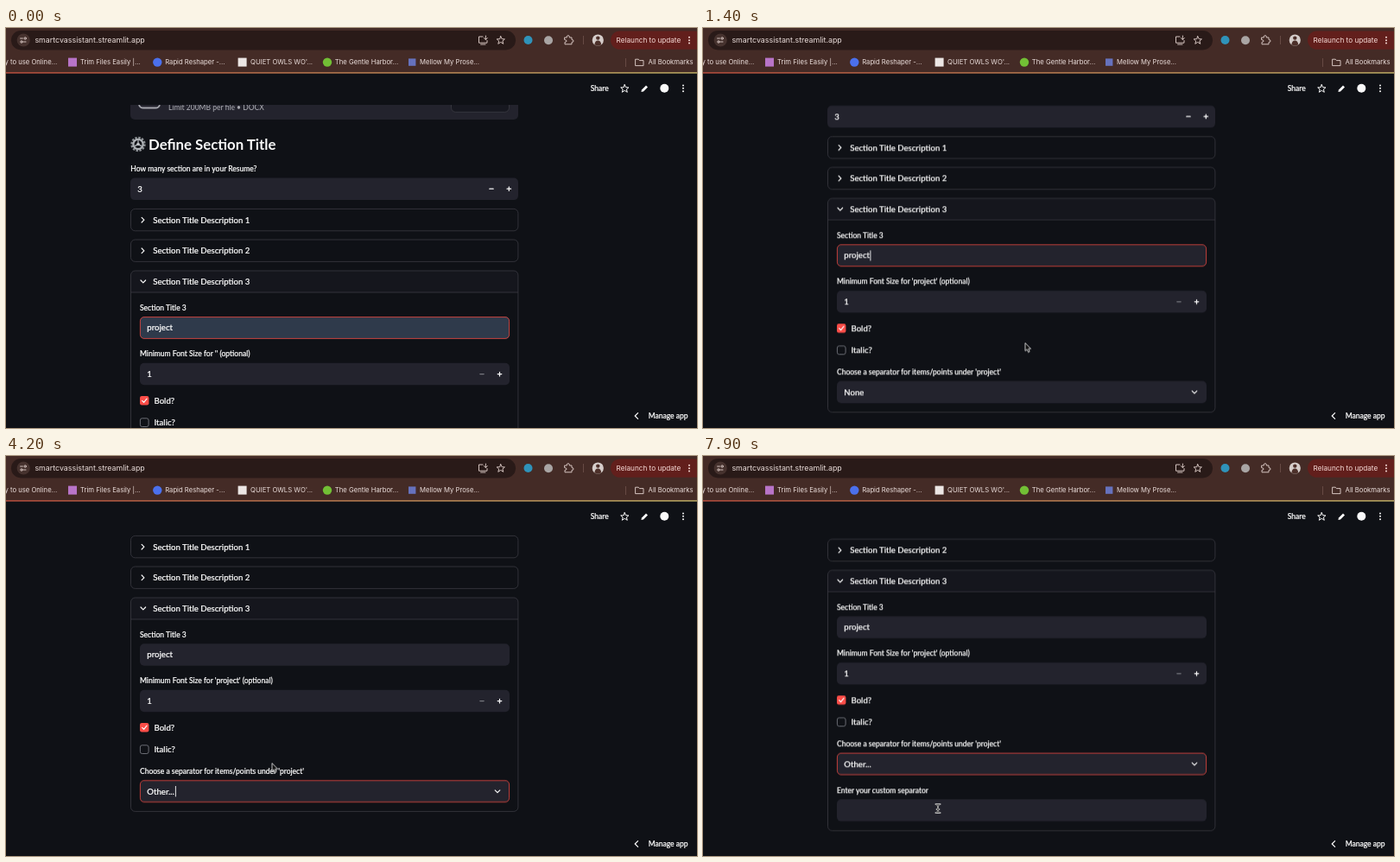
Write an HTML page that moves like this. It is 800 by 463 pixels and loops after 8 s.

```html
<!DOCTYPE html>
<html lang="en">
<head>
<meta charset="utf-8">
<title>Resume section form</title>
<style>
  html, body { margin: 0; width: 100%; height: 100%; overflow: hidden; background: #0f1116; }
  svg { display: block; width: 100vw; height: 100vh; }

  text { font: 500 9.6px Lato, "Open Sans", sans-serif; fill: #fafafa; stroke: #fafafa; stroke-width: .22; }
  .label { font-size: 8.5px; }
  .title { font-size: 16.8px; font-weight: 700; stroke: none; }
  .hint { fill: #a5a6ad; stroke: none; }
  .bar text { font: 400 7.7px Inter, Roboto, sans-serif; fill: #ecdfdc; stroke: none; }
  .bar .url { font-size: 8.85px; }
  .bar .update { font-size: 8.2px; fill: #f8dcd8; }

  .field { fill: #23232d; }
  .card { fill: none; stroke: #3b3c43; stroke-width: .8; }
  .focus { fill: none; stroke: #e0453d; stroke-width: .85; }
  .line { fill: none; stroke: #fafafa; stroke-width: 1.2; stroke-linecap: round; stroke-linejoin: round; }
  .thin { stroke-width: 1; }
  .bar .line { stroke: #dccbc7; stroke-width: .95; }
  .muted { stroke: #77787f; }
  .caret { stroke: #fafafa; stroke-width: .9; animation: blink 1s -.85s step-end infinite; }

  /* One 8 s timeline: 1% = 80 ms */
  .page, .pointer { animation: scroll 8s linear infinite; }
  .pointer { animation-name: point; animation-timing-function: ease-in-out; }
  .step { animation: 8s step-end infinite; }
  .autofill { animation-name: autofill; }
  .blank { animation-name: blank; }
  .named { animation-name: named; }
  .typing { animation-name: typing; }
  .picking { animation-name: picking; }
  .none { animation-name: none-value; }
  .other { animation-name: other-value; }
  .custom { animation-name: custom; }
  .short { animation-name: short; }
  .arrow { animation-name: arrow; }
  .beam { animation-name: beam; }

  @keyframes scroll {
    0%, 12.5% { transform: translateY(0); }
    17.5% { transform: translateY(-83.5px); animation-timing-function: ease-out; }
    21%, 63.75% { transform: translateY(-117px); }
    65% { transform: translateY(-122.7px); animation-timing-function: ease-out; }
    68.5%, 100% { transform: translateY(-148.7px); }
  }
  @keyframes point {
    0%, 21.25% { transform: translate(373px, 364.5px); }
    25%, 37.5% { transform: translate(373.5px, 380px); }
    47.5%, 55% { transform: translate(308px, 355.5px); }
    63.75%, 67.5% { transform: translate(266.8px, 426px); }
    72.5%, 100% { transform: translate(272px, 408px); }
  }
  @keyframes blink { 0% { opacity: 1; } 50%, 100% { opacity: 0; } }
  @keyframes autofill { 0% { opacity: 1; } 3.75%, 100% { opacity: 0; } }
  @keyframes blank { 0% { opacity: 1; } 8.75%, 100% { opacity: 0; } }
  @keyframes named { 0% { opacity: 0; } 8.75%, 100% { opacity: 1; } }
  @keyframes typing { 0% { opacity: 1; } 25%, 100% { opacity: 0; } }
  @keyframes picking { 0% { opacity: 0; } 37.5%, 100% { opacity: 1; } }
  @keyframes none-value { 0% { opacity: 1; } 50%, 100% { opacity: 0; } }
  @keyframes other-value { 0% { opacity: 0; } 50%, 100% { opacity: 1; } }
  @keyframes custom { 0% { opacity: 0; } 57.5%, 100% { opacity: 1; } }
  @keyframes short { 0% { opacity: 1; } 57.5%, 100% { opacity: 0; } }
  @keyframes arrow { 0% { opacity: 0; } 6.25% { opacity: 1; } 25% { opacity: 0; } 41.25% { opacity: 1; } 68.75%, 100% { opacity: 0; } }
  @keyframes beam { 0% { opacity: 0; } 25% { opacity: 1; } 41.25% { opacity: 0; } 68.75%, 100% { opacity: 1; } }
</style>
</head>
<body>
<svg viewBox="0 0 800 463">
  <defs>
    <linearGradient id="stripe">
      <stop stop-color="#e8604a"/>
      <stop offset="1" stop-color="#f2dc7c"/>
    </linearGradient>
    <clipPath id="view"><rect y="89" width="800" height="374"/></clipPath>
    <rect id="box" x="155" width="428" height="25.6" rx="5"/>
    <rect id="ring" x="155.4" y=".4" width="427.2" height="24.8" rx="4.6"/>
    <path id="right" d="M-1.4-2.8 1.4 0-1.4 2.8"/>
    <path id="down" d="M-2.8-1.4 0 1.4 2.8-1.4"/>
    <path id="minus" d="M-2.2 0H2.2"/>
    <path id="plus" d="M-2.3 0H2.3M0-2.3V2.3"/>
    <path id="star" d="M0-4.6 1.4-1.5 4.6-1.3 2.1.8 3 4.1 0 2.2-3 4.1-2.1.8-4.6-1.3-1.4-1.5Z"/>
    <path id="ibeam" d="M-2.4-5Q0-5 0-3.6Q0-5 2.4-5M0-3.6V3.6M-2.4 5Q0 5 0 3.6Q0 5 2.4 5M-1.3 1H1.3"/>
    <g id="dots"><circle cy="-3.4" r="1"/><circle r="1"/><circle cy="3.4" r="1"/></g>
  </defs>

  <rect width="800" height="463" fill="#0f1116"/>

  <g clip-path="url(#view)">
    <g class="page">
      <!-- uploader remainder -->
      <rect class="field" x="144" y="60" width="449" height="46" rx="5"/>
      <path d="M154 89Q155 92.5 159 92.5H173Q177 92.5 178 89" fill="none" stroke="#a5a6ad" stroke-width="1.8"/>
      <text class="label hint" x="188" y="95.4">Limit 200MB per file • DOCX</text>
      <rect x="515.5" y="72" width="67" height="25.3" rx="5" fill="#171820" stroke="#3b3c43" stroke-width=".8"/>

      <g transform="translate(153 134.5)" fill="none">
        <circle r="7.4" stroke="#8c9094" stroke-width="2.6" stroke-dasharray="2.4 1.475"/>
        <circle r="5.6" stroke="#aeb2b6" stroke-width="2.2"/>
        <path d="M0 0V-5M0 0 4.4 2.5M0 0-4.4 2.5" stroke="#9a9ea2" stroke-width="1.5"/>
        <circle r="1.8" fill="#bfc3c6"/>
      </g>
      <text class="title" x="165" y="141">Define Section Title</text>

      <text class="label" x="144.3" y="165.8">How many section are in your Resume?</text>
      <rect class="field" x="144" y="173.5" width="449" height="25.6" rx="5"/>
      <text x="152.3" y="189.7">3</text>
      <use href="#minus" class="line" x="562" y="186.2"/>
      <use href="#plus" class="line" x="582.3" y="186.2"/>

      <rect class="card" x="144.5" y="209.4" width="448.4" height="25.4" rx="5"/>
      <use href="#right" class="line" x="158.5" y="222.2"/>
      <text x="170.2" y="225.8">Section Title Description 1</text>

      <rect class="card" x="144.5" y="245" width="448.4" height="25.4" rx="5"/>
      <use href="#right" class="line" x="158.5" y="257.8"/>
      <text x="170.2" y="261.4">Section Title Description 2</text>

      <path d="M144.5 306V286Q144.5 281 149.5 281H588Q592.9 281 592.9 286V306Z" fill="#15161d"/>
      <path class="card" d="M144.5 306H592.9"/>
      <rect class="card step short" x="144.5" y="281" width="448.4" height="247.4" rx="5"/>
      <rect class="card step custom" x="144.5" y="281" width="448.4" height="301.4" rx="5"/>
      <use href="#down" class="line" x="158.8" y="293.4"/>
      <text x="170.2" y="297.4">Section Title Description 3</text>

      <text class="label" x="155" y="326.7">Section Title 3</text>
      <use href="#box" class="field" y="334.2"/>
      <use href="#box" class="step autofill" y="334.2" fill="#2f3a4b"/>
      <text x="163.3" y="350.3">project</text>
      <g class="step typing">
        <use href="#ring" class="focus" y="334.2"/>
        <path class="caret" d="M193.9 341.2V353.2"/>
      </g>

      <text class="label step blank" x="155" y="380.4">Minimum Font Size for '' (optional)</text>
      <text class="label step named" x="155" y="380.4">Minimum Font Size for 'project' (optional)</text>
      <use href="#box" class="field" y="387.7"/>
      <text x="163.3" y="404">1</text>
      <use href="#minus" class="line muted" x="551" y="400.6"/>
      <use href="#plus" class="line" x="571.5" y="400.6"/>

      <rect x="155" y="426" width="10.4" height="10.4" rx="2.2" fill="#fb4d48"/>
      <path class="line" d="M157.6 431.3 159.6 433.3 163 429.2"/>
      <text x="171.5" y="434.7">Bold?</text>
      <rect x="155.4" y="451.8" width="9.7" height="9.7" rx="2.2" fill="none" stroke="#777980" stroke-width=".9"/>
      <text x="171.5" y="460.2">Italic?</text>

      <text class="label step blank" x="155" y="484.7">Choose a separator for items/points under ''</text>
      <text class="label step named" x="155" y="484.7">Choose a separator for items/points under 'project'</text>
      <use href="#box" class="field" y="492.3"/>
      <text class="step none" x="163.3" y="508.5">None</text>
      <text class="step other" x="163.3" y="508.5">Other...</text>
      <use href="#down" class="line" x="569" y="505.2"/>
      <use href="#ring" class="focus step picking" y="492.3"/>
      <g class="step other"><path class="caret" d="M196.4 499V511.4"/></g>

      <g class="step custom">
        <text class="label" x="155" y="538.5">Enter your custom separator</text>
        <use href="#box" class="field" y="546"/>
      </g>
    </g>
  </g>

  <!-- app header -->
  <rect y="51.2" width="800" height="1.3" fill="url(#stripe)"/>
  <text class="label" x="676.7" y="72.9">Share</text>
  <use href="#star" class="line thin" x="716.3" y="70.2"/>
  <path d="M735.4 74 736 71.5 741 66.4 743 68.4 738 73.4Z" fill="#fafafa"/>
  <circle cx="762.3" cy="69.8" r="5" fill="#fafafa"/>
  <use href="#dots" x="784" y="69.8" fill="#fafafa"/>

  <path class="line" d="M731.6 445.6 728.2 449 731.6 452.4"/>
  <text class="label" x="743.7" y="452">Manage app</text>

  <!-- browser bars -->
  <g class="bar">
    <rect width="800" height="51.2" fill="#442b26"/>
    <rect x="6" y="3" width="584" height="22.4" rx="11.2" fill="#291a18"/>
    <circle cx="20.2" cy="14" r="7.6" fill="#46322e"/>
    <path class="line" d="M16.6 12H19.4M23 16H20.6"/>
    <circle class="line" cx="22.2" cy="12" r="1.2"/>
    <circle class="line" cx="18" cy="16" r="1.2"/>
    <text class="url" x="33.4" y="17.2">smartcvassistant.streamlit.app</text>

    <path class="line" d="M552 10H547.5V17.2H557V14.5M549.6 19H555M555.4 9V13.2M553.4 11.6 555.4 13.5 557.4 11.6"/>
    <use href="#star" class="line" x="572.8" y="14.2"/>
    <circle cx="604.5" cy="14" r="5" fill="#2f93ba"/>
    <circle cx="628" cy="14.2" r="5" fill="#a9a5a4"/>
    <path class="line" d="M647 11H649.3Q649 8.6 650.8 8.6T652.3 11H655V13.6Q657 13.4 657 15T655 16.4V18.8H647V16.4Q649 16.4 649 15T647 13.6Z"/>
    <path d="M668.5 9V19M717.5 35V45" stroke="#70534d" stroke-width=".8"/>
    <circle cx="685.3" cy="14" r="6.6" fill="#d5cdca"/>
    <circle cx="685.3" cy="11.6" r="2.2" fill="#4d302a"/>
    <path d="M681.4 19.2Q681.8 14.4 685.3 14.4T689.2 19.2Q685.3 21.8 681.4 19.2Z" fill="#4d302a"/>
    <rect x="700" y="3.4" width="108" height="21.4" rx="10.7" fill="#621f1c"/>
    <text class="update" x="706.6" y="17.1">Relaunch to update</text>
    <use href="#dots" x="791" y="14.2" fill="#f8dcd8"/>

    <text x="-1.5" y="42.4">y to use Online...</text>
    <rect x="72" y="34.6" width="10" height="10" fill="#b874c8"/>
    <text x="86" y="42.4">Trim Files Easily |...</text>
    <circle cx="175.3" cy="39.6" r="5.2" fill="#4b70ec"/>
    <text x="184.2" y="42.4">Rapid Reshaper -...</text>
    <rect x="268.6" y="34.6" width="10" height="10" fill="#ece6e4"/>
    <text x="283" y="42.4">QUIET OWLS WO'...</text>
    <circle cx="372" cy="39.6" r="5.2" fill="#72bf35"/>
    <text x="380.8" y="42.4">The Gentle Harbor...</text>
    <rect x="466" y="35.4" width="8.4" height="8.4" fill="#6672bd"/>
    <text x="479" y="42.4">Mellow My Prose...</text>
    <path class="line" d="M729 36.2H732.2L733.4 37.6H738V43.6H729Z"/>
    <text x="743.6" y="42.4">All Bookmarks</text>
  </g>

  <g class="pointer">
    <path class="step arrow" d="M0 0V9.3L2.1 7.5 3.6 10.8 5.2 10.1 3.7 6.9H6.6Z" fill="#111" stroke="#f2f2f2" stroke-width=".8" stroke-linejoin="round"/>
    <g class="step beam" fill="none" stroke-linecap="round">
      <use href="#ibeam" stroke="#f2f2f2" stroke-width="2"/>
      <use href="#ibeam" stroke="#111" stroke-width=".8"/>
    </g>
  </g>
</svg>
</body>
</html>
```
